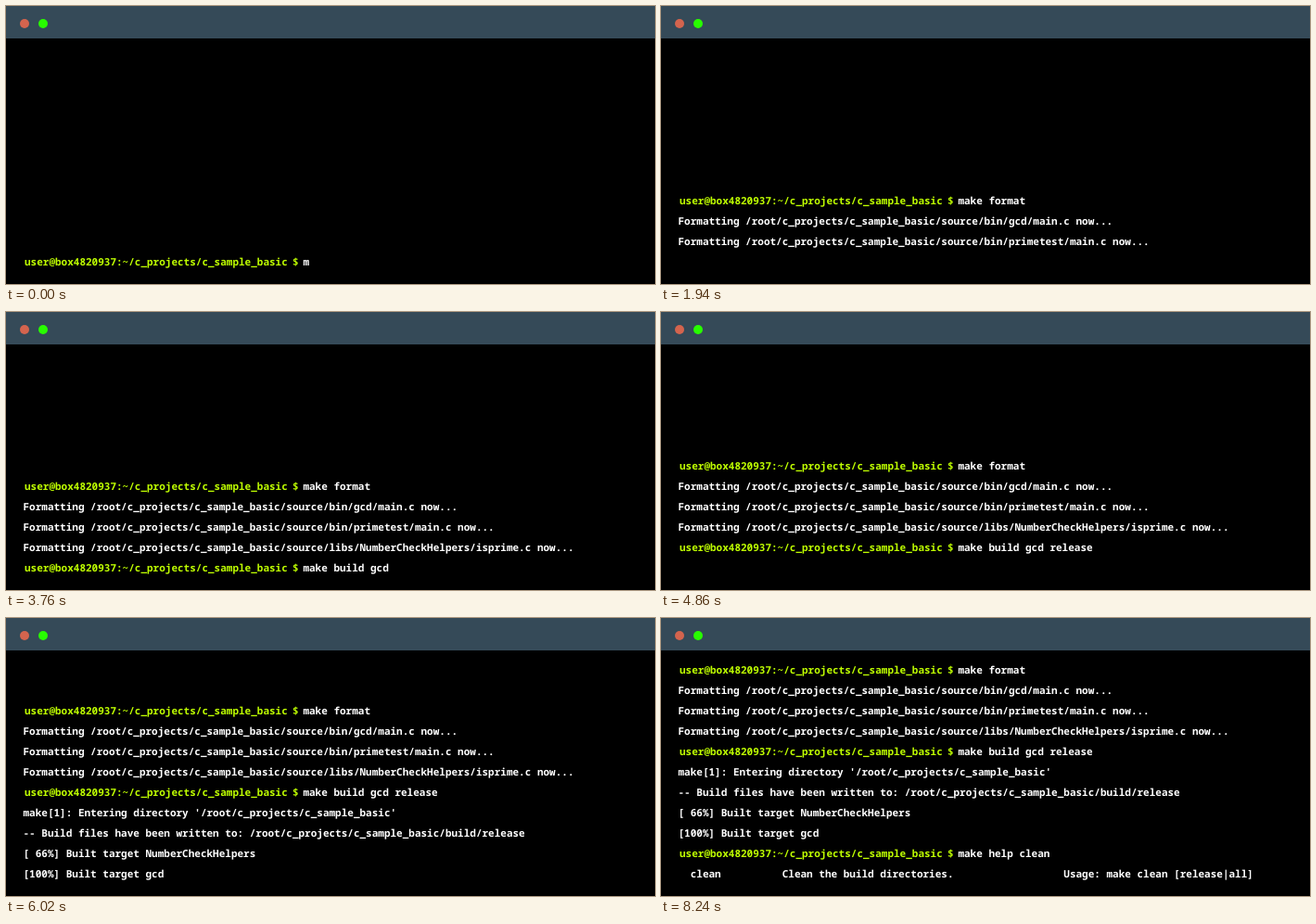
These frames come from a looping animation (700 by 300 pixels, 9690 ms). An HTML page with a canvas:

```html
<!DOCTYPE html>
<html lang="en">
<head>
<meta charset="utf-8">
<title>Terminal session</title>
<style>
  html, body { margin: 0; width: 100%; height: 100%; overflow: hidden; background: #000; }
  canvas { display: block; }
</style>
</head>
<body>
<canvas id="stage" width="700" height="300"></canvas>
<script>
const ctx = document.getElementById("stage").getContext("2d");

const LOOP = 9690;
const KEY_DELAY = 100, ENTER_DELAY = 300, PRINT_DELAY = 200, SCROLL_DELAY = 120;
const ROW_HEIGHT = 22, LAST_BASELINE = 280;
const LIME = "#bfff00", WHITE = "#fff";

const FOLDER = "c_projects/c_sample_basic";
const ROOT = "/root/" + FOLDER;
const PROMPT = "user@box4820937:~/" + FOLDER;
const LIBRARY = "NumberCheckHelpers";

const formatting = file => `Formatting ${ROOT}/source/${file} now...`;

const session = [
  { command: "make format", output: [
    formatting("bin/gcd/main.c"),
    formatting("bin/primetest/main.c"),
    formatting(`libs/${LIBRARY}/isprime.c`)
  ] },
  { command: "make build gcd release", output: [
    `make[1]: Entering directory '${ROOT}'`,
    `-- Build files have been written to: ${ROOT}/build/release`,
    `[ 66%] Built target ${LIBRARY}`,
    "[100%] Built target gcd"
  ] },
  { command: "make help clean", output: [
    "  clean".padEnd(17) + "Clean the build directories.".padEnd(46) + "Usage: make clean [release|all]"
  ] }
];

// Each row knows when it appears and when the screen scrolls past it.
function schedule(blocks) {
  const rows = [];
  let time = 0;
  for (const { command, output } of blocks) {
    const entered = time + (command.length - 1) * KEY_DELAY + ENTER_DELAY;
    rows.push({ command, start: time, scroll: entered });
    time = entered + PRINT_DELAY;
    for (const text of output) {
      rows.push({ text, start: time, scroll: time + SCROLL_DELAY });
      time += SCROLL_DELAY + PRINT_DELAY;
    }
  }
  rows[rows.length - 1].scroll = Infinity;
  return rows;
}

const rows = schedule(session);

function write(text, x, y, color) {
  ctx.fillStyle = color;
  ctx.fillText(text, x, y);
}

function dot(x, color) {
  ctx.fillStyle = color;
  ctx.beginPath();
  ctx.arc(x, 19, 5, 0, Math.PI * 2);
  ctx.fill();
}

function drawRow(row, y, time) {
  if (row.text) {
    write(row.text, 18.5, y, WHITE);
    return;
  }
  const typed = Math.floor((time - row.start) / KEY_DELAY) + 1;
  write(PROMPT, 20, y, LIME);
  write("$", 309, y, LIME);
  write(row.command.slice(0, typed), 320.4, y, WHITE);
}

function draw(time) {
  ctx.fillStyle = "#000";
  ctx.fillRect(0, 0, 700, 300);
  ctx.fillStyle = "#354a58";
  ctx.fillRect(0, 0, 700, 35);
  dot(20, "#d4644e");
  dot(40, "#28fc00");

  ctx.font = '800 11px "Noto Sans Mono", "DejaVu Sans Mono", monospace';
  ctx.textRendering = "geometricPrecision";
  const scrolled = rows.filter(row => row.scroll <= time).length;
  rows.forEach((row, i) => {
    if (row.start <= time) drawRow(row, LAST_BASELINE - (scrolled - i) * ROW_HEIGHT, time);
  });
}

const origin = performance.now();

function tick() {
  draw((performance.now() - origin) % LOOP);
  requestAnimationFrame(tick);
}

tick();
</script>
</body>
</html>
```
